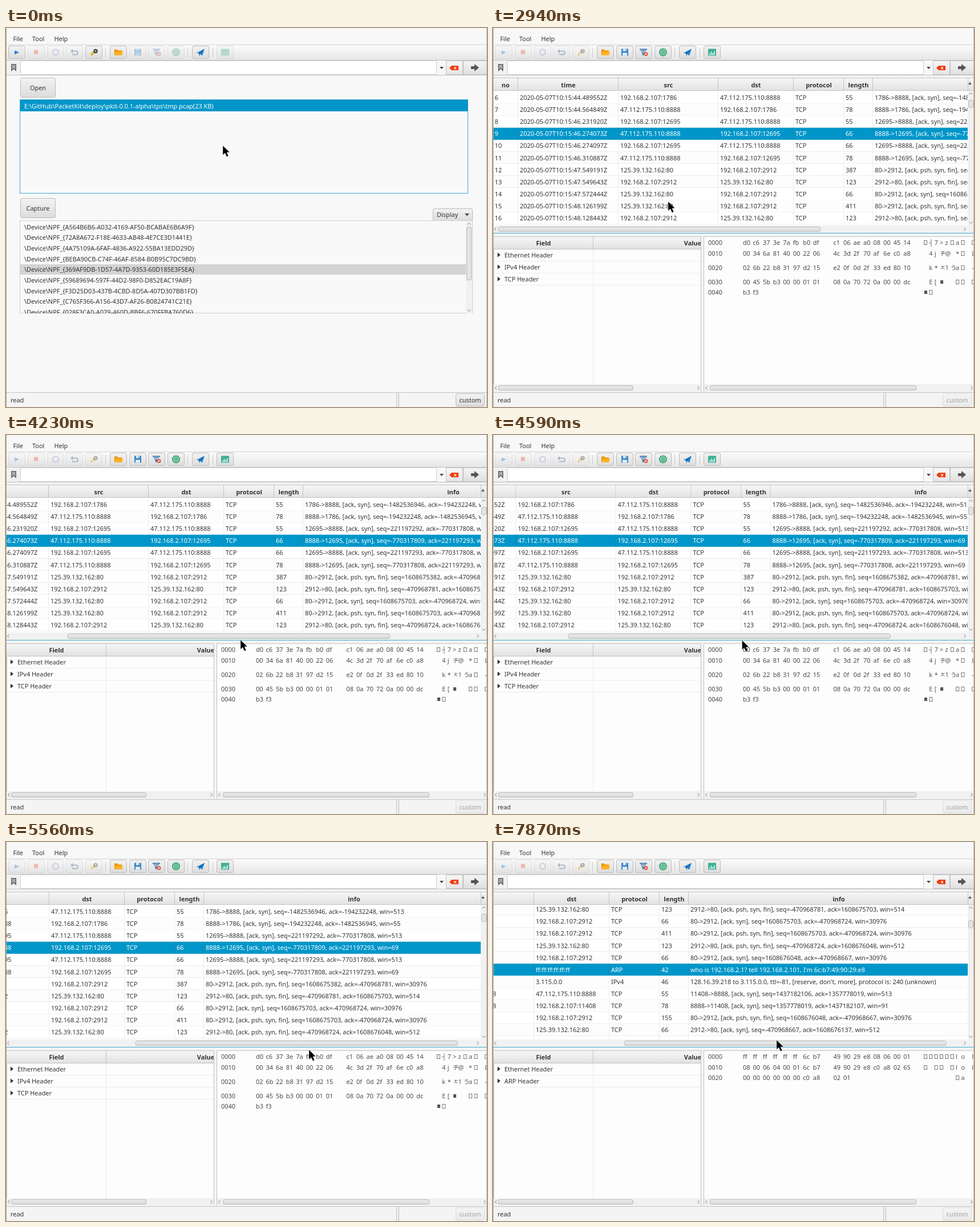
These frames come from a looping animation (843x664 px, 8 s). An HTML page with a canvas:

```html
<!DOCTYPE html>
<html lang="en">
<head>
<meta charset="utf-8">
<title>Packet capture viewer</title>
<style>
html, body { margin: 0; width: 100%; height: 100%; overflow: hidden; background: #f4f4f4; }
canvas { display: block; }
</style>
</head>
<body>
<canvas id="stage" width="843" height="664"></canvas>
<script>
const c = document.getElementById('stage').getContext('2d');
const LOOP = 8000, STEP = 120;
const FONT = '"Noto Sans", "Open Sans", sans-serif';
const INK = '#333', BLUE = '#0096c9', EDGE = '#c3c3c3', SOFT = '#ececec';

// start, steps, then the values reached: cursor x, y, scroll x, scroll y
const MOVES = [
  [120, 5, 284, 134, 0, 0],
  [1800, 5, 321, 190, 0, 0],
  [2680, 2, 317, 239, 0, 0],
  [2940, 1, 307, 304, 0, 0],
  [3080, 3, 312, 347, 0, 0],
  [3600, 5, 402, 356, 132, 0],
  [4230, 1, 411, 359, 145, 0],
  [4350, 4, 445, 360, 191, 0],
  [4960, 1, 451, 361, 199, 0],
  [5080, 5, 531, 364, 319, 0],
  [5680, 1, 519, 353, 323, 0],
  [5800, 2, 331, 274, 323, 0],
  [6070, 2, 331, 274, 323, 76],
  [6340, 2, 331, 274, 323, 151.6],
  [6580, 3, 340, 224, 323, 151.6],
  [6970, 3, 412, 323, 323, 151.6],
  [7360, 1, 459, 336, 323, 151.6],
  [7510, 4, 497, 347, 323, 151.6]
];

const HOSTS = { A: '192.168.2.107', B: '47.112.175.110', C: '125.39.132.162' };
const ROWS = `44.489552 A:1786 B:8888 55 s -1482536946 -194232248 513
44.564849 B:8888 A:1786 78 s -194232248 -1482536945 55
46.231920 A:12695 B:8888 55 s 221197292 -770317808 513
46.274073 B:8888 A:12695 66 s -770317809 221197293 69
46.274097 A:12695 B:8888 66 s 221197293 -770317808 513
46.310887 B:8888 A:12695 78 s -770317808 221197293 69
47.549191 C:80 A:2912 387 f 1608675382 -470968781 30976
47.549643 A:2912 C:80 123 f -470968781 1608675703 514
47.572444 C:80 A:2912 66 s 1608675703 -470968724 30976
48.126199 C:80 A:2912 411 f 1608675703 -470968724 30976
48.128443 A:2912 C:80 123 f -470968724 1608676048 512
48.171020 C:80 A:2912 66 s 1608676048 -470968667 30976
arp
ip
48.902114 A:11408 B:8888 55 s 1437182106 1357778019 513
48.940382 B:8888 A:11408 78 s 1357778019 1437182107 91
49.120417 C:80 A:2912 155 f 1608676048 -470968667 30976
49.160933 A:2912 C:80 66 s -470968667 1608676137 512
49.310226 B:8888 A:11408 106 f 1357778019 1437182107 91`.split('\n').map((line, i) => {
  const [time, src, dst, len, kind, seq, ack, win] = line.split(' ');
  const stamp = s => `2020-05-07T10:15:${s}Z`;
  if (time === 'arp') return [18, stamp('48.300152'), '6c:b7:49:90:29:e8', 'ff:ff:ff:ff:ff:ff', 'ARP', 42,
    "who is 192.168.2.1? tell 192.168.2.101, I'm 6c:b7:49:90:29:e8"];
  if (time === 'ip') return [19, stamp('48.611840'), '128.16.39.218', '3.115.0.0', 'IPv4', 46,
    "128.16.39.218 to 3.115.0.0, ttl=-81, [reserve, don't, more], protocol is: 240 (unknown)"];
  const host = s => HOSTS[s[0]] + s.slice(1), port = s => s.split(':')[1];
  const flags = kind === 's' ? 'ack, syn' : 'ack, psh, syn, fin';
  return [i + 6, stamp(time), host(src), host(dst), 'TCP', len,
    `${port(src)}->${port(dst)}, [${flags}], seq=${seq}, ack=${ack}, win=${win}`];
});
const COLS = ['no', 'time', 'src', 'dst', 'protocol', 'length', 'info'];
const COL_X = [0, 44, 220, 395, 527, 615, 666, 1192];

// each dump line: y, bytes, characters
const DUMPS = {
  first: { tree: ['Ethernet Header', 'IPv4 Header'], lines: [
    [376, 'b0dfc106aea0d0c6373e7afb0800d502', 'a□□□a □┤ 7'],
    [395, '0020ae67e62daff00000801027da2bef', '  agW-a□'],
    [413, '00000101080a00dce44700dce447', '  □□□  | |']] },
  tcp: { tree: ['Ethernet Header', 'IPv4 Header', 'TCP Header'], lines: [
    [376, 'd0c6373e7afbb0dfc106aea008004514', '□┤7>z□a□ □'],
    [395, '00346a81400022064c3d2f70af6ec0a8', ' 4jチ@ *□ L'],
    [420, '026b22b83197d215e20f0d2f33ed8010', ' k*ㅈ1うa□ -'],
    [445, '00455bb300000101080a70720a0000dc', ' E[■  □□ □'],
    [463, 'b3f3', '■□']] },
  arp: { tree: ['Ethernet Header', 'ARP Header'], lines: [
    [376, 'ffffffffffff6cb7499029e808060001', '□□□□□□lo l'],
    [395, '0800060400016cb7499029e8c0a80265', '□ □□ □lo l'],
    [413, '000000000000c0a80201', '      □a']] }
};

function pose(t) {
  let now = [380, 206, 0, 0];
  for (const [start, n, ...to] of MOVES) {
    if (t < start) break;
    const k = Math.min(n, Math.floor((t - start) / STEP) + 1) / n;
    now = now.map((v, i) => v + (to[i] - v) * k);
  }
  return now;
}

function text(s, x, y, { size = 10.95, bold, color = INK, align = 'left' } = {}) {
  c.font = `${bold ? 'bold ' : ''}${size}px ${FONT}`;
  c.textAlign = align;
  c.fillStyle = color;
  c.fillText(s, x, y + 4);
}
function box(x, y, w, h, fill, line) {
  if (fill) { c.fillStyle = fill; c.fillRect(x, y, w, h); }
  if (line) { c.strokeStyle = line; c.lineWidth = 1; c.strokeRect(x + .5, y + .5, w - 1, h - 1); }
}
function shade(y, h, a, b) {
  const g = c.createLinearGradient(0, y, 0, y + h);
  g.addColorStop(0, a); g.addColorStop(1, b);
  return g;
}
function poly(pts, fill) {
  c.beginPath();
  for (let i = 0; i < pts.length; i += 2) c.lineTo(pts[i], pts[i + 1]);
  c.closePath();
  c.fillStyle = fill; c.fill();
}
function disc(x, y, r, fill) {
  c.beginPath(); c.arc(x, y, r, 0, 7);
  c.fillStyle = fill; c.fill();
}
function ring(x, y, r, line, width) {
  c.beginPath(); c.arc(x, y, r, 0, 7);
  c.strokeStyle = line; c.lineWidth = width; c.stroke();
}
function round(x, y, w, h, r, fill, line, width = 1) {
  c.beginPath(); c.roundRect(x + .5, y + .5, w - 1, h - 1, r);
  c.fillStyle = fill; c.fill();
  c.strokeStyle = line; c.lineWidth = width; c.stroke();
}
function clip(x, y, w, h, draw) {
  c.save(); c.beginPath(); c.rect(x, y, w, h); c.clip(); draw(); c.restore();
}
function fade(a, draw) { c.save(); c.globalAlpha *= a; draw(); c.restore(); }
function button(x, y, w, h, label) {
  round(x, y, w, h, 2.5, shade(y, h, '#f3f3f3', '#dcdcdc'), '#bcbcbc');
  if (label) text(label, x + w / 2, y + h / 2, { align: 'center' });
}
function chevron(x, y, dx, dy) {
  c.beginPath();
  c.moveTo(x - dx * 1.5 - dy * 3, y - dy * 1.5 - dx * 3);
  c.lineTo(x + dx * 1.5, y + dy * 1.5);
  c.lineTo(x - dx * 1.5 + dy * 3, y - dy * 1.5 + dx * 3);
  c.strokeStyle = '#777'; c.lineWidth = 1; c.stroke();
}
function hbar(x, y, w, from, to) {
  box(x, y, w, 13, '#f1f1f1');
  chevron(x + 4, y + 6.5, -1, 0); chevron(x + w - 4, y + 6.5, 1, 0);
  round(from, y + 2, to - from, 9, 2.5, shade(y, 11, '#f0f0f0', '#d9d9d9'), '#b9b9b9');
}
function vbar(x, y, h, from, to) {
  box(x, y, 11, h, '#f1f1f1');
  chevron(x + 5.5, y + 5, 0, -1); chevron(x + 5.5, y + h - 5, 0, 1);
  round(x + 1, from, 9, to - from, 2.5, '#e4e4e4', '#b9b9b9');
}

const ICONS = [
  () => poly([-4, -3, 4, 0, -4, 4], '#1a82dc'),
  () => box(-4, -4, 7, 7, '#ef5a3c'),
  () => ring(0, 0, 5, '#8c95c4', 2),
  () => {
    poly([-7, -2, -3, -6, -3, 2], '#44688e');
    c.beginPath(); c.moveTo(-4, -2); c.lineTo(3, -2); c.arc(3, 1, 3, -1.57, 1.57); c.lineTo(-4, 4);
    c.strokeStyle = '#44688e'; c.lineWidth = 2; c.stroke();
  },
  () => {
    c.lineCap = 'round';
    c.beginPath(); c.moveTo(-4, 4); c.lineTo(1, -1);
    c.strokeStyle = '#e0ac12'; c.lineWidth = 3.5; c.stroke();
    ring(3, -2, 2.5, '#444', 2.5);
    c.lineCap = 'butt';
  },
  () => {
    poly([-7, -5, -2, -5, -1, -3, 6, -3, 6, 5, -7, 5], '#f29200');
    poly([-5, -1, 8, -1, 6, 5, -7, 5], '#ffb21c');
  },
  () => {
    box(-6, -6, 12, 12, '#3c86c4');
    box(-3, -6, 6, 4, '#e8f1f8'); box(-4, 1, 8, 5, '#e8f1f8'); box(1, -5, 1, 3, '#3c86c4');
  },
  () => {
    box(-7, -6, 13, 2, '#3678b4'); box(-5, -3, 9, 1.5, '#3678b4');
    poly([-4, 0, 2, 0, 0, 3, 0, 6, -2, 5, -2, 3], '#3678b4');
    ring(4, 3, 2.5, '#e4573d', 2);
  },
  () => { ring(0, 0, 6, '#3aa876', 2); disc(0, 0, 4.5, '#67bd96'); },
  () => { poly([-7, 1, 7, -6, 3, 6, -1, 3], '#2385d4'); poly([-3, 2, 7, -6, -1, 3, -2, 7], '#135c9f'); },
  () => {
    box(-7, -6, 14, 12, '#3fae94');
    [3, 6, 4, 7].forEach((h, i) => box(-5 + i * 2.7, 5 - h, 1.5, h, '#e9fff9'));
  }
];
const ICON_X = [4, 38, 72, 105, 139, 182, 216, 249, 283, 326, 369];

function frame(loaded, focusOpen) {
  box(0, 0, 843, 664, '#f4f4f4');
  box(0, 0, 843, 30, '#f8f8f8');
  text('File', 12.5, 18.5); text('Tool', 46, 18.5); text('Help', 84.5, 18.5);
  box(0, 29, 843, 1, '#d2d2d2');
  box(0, 30, 843, 26, shade(30, 26, '#fbfbfb', '#e6e6e6'));
  const on = loaded ? [5, 6, 7, 8, 9, 10] : [0, 4, 5, 9];
  ICON_X.forEach((x, i) => fade(on.includes(i) ? 1 : .38, () => {
    button(x, 31, 30, 23);
    if (i === 5 && focusOpen) round(x, 31, 30, 23, 2.5, '#eaeaea', '#039ed3', 2);
    c.translate(x + 15, 42.5);
    ICONS[i]();
  }));
  for (const x of [174, 318, 362]) box(x, 35, 1, 16, '#cacaca');

  box(0, 56, 843, 28, '#f1f1f1');
  box(0, 56, 843, 1, EDGE); box(0, 82, 843, 1, EDGE);
  poly([9, 63, 18, 63, 18, 76, 13.5, 72, 9, 76], '#666');
  poly([10.5, 64.5, 16.5, 64.5, 16.5, 72.5, 13.5, 70, 10.5, 72.5], '#aaa');
  box(25, 57, 730, 25, '#fff', '#cfcfcf');
  box(755, 57, 16, 25, '#f8f8f8');
  poly([760, 68, 767, 68, 763.5, 72], '#444');
  box(771, 57, 30, 25, shade(57, 25, '#f8f8f8', '#e4e4e4'), EDGE);
  poly([777, 70, 781, 66, 793, 66, 793, 74, 781, 74], '#f03c0e');
  text('×', 787, 69.5, { size: 10, bold: true, color: '#fff', align: 'center' });
  box(801, 57, 42, 25, shade(57, 25, '#f5f5f5', '#dfdfdf'), EDGE);
  poly([815, 67, 821, 67, 821, 63, 829, 69.5, 821, 76, 821, 72, 815, 72], '#555');

  box(0, 638, 843, 1, EDGE);
  text('read', 8, 651.5);
  box(684, 639, 5, 25, '#eee'); box(684, 639, 1, 25, EDGE); box(688, 639, 1, 25, EDGE);
  fade(loaded ? .4 : 1, () => button(788, 640, 51, 23, 'custom'));
}

function start() {
  box(0, 84, 843, 554, '#f8f8f8');
  button(25, 87, 62, 35, 'Open');
  box(24, 125, 786, 165, '#f9f9f9', '#3fa9cf');
  box(25, 126, 784, 20, BLUE);
  text('E:\\GitHub\\PacketKit\\deploy\\pkit-0.0.1-alpha\\tps\\tmp.pcap(23 KB)', 32, 136.5, { color: '#fff' });
  button(25, 298, 62, 35, 'Capture');
  button(748, 316, 70, 22);
  text('Display', 755, 327);
  poly([804, 325, 812, 325, 808, 329.5], '#444');
  box(24, 337, 794, 163, '#f9f9f9', '#d0d0d0');
  box(25, 414, 781, 18, '#d3d3d3');
  const ids = ['A564B6B6-A032-4169-AF50-BCABAE6B6A9F', '72A8A672-F18E-4633-AB48-4E7CE3D1441E',
    '4A75109A-6FAF-4836-A922-55BA13EDD29D', 'BEBA90CB-C74F-46AF-8584-B0B95C7DC9BD',
    '369AF9DB-1D57-4A7D-9353-60D185E3F5EA', '59689694-597F-44D2-98F0-D852EAC19A8F',
    'F3D25D03-437B-4CBD-8D5A-407D307BB1FD', 'C765F366-A156-43D7-AF26-B0824741C21E',
    '028F3CA0-A079-460D-BBF6-670FFBA760D6'];
  clip(25, 338, 781, 162, () => ids.forEach((id, i) =>
    text(`\\Device\\NPF_{${id}}`, 32, 348.5 + i * 18.7)));
  vbar(806, 338, 162, 348, 442);
}

function header(x, y, w, h, label) {
  box(x, y, w, h, shade(y, h, '#f6f6f6', '#e2e2e2'));
  box(x + w - 1, y, 1, h, EDGE);
  text(label, x + w / 2, y + h / 2 + .5, { bold: true, align: 'center' });
}

function table(sx, sy, picked, focused) {
  box(0, 84, 843, 276, '#f4f4f4');
  box(0, 87, 843, 1, EDGE);
  box(0, 88, 843, 22, shade(88, 22, '#f6f6f6', '#e2e2e2'));
  box(1, 110, 831, 236, '#fff');
  clip(1, 88, 831, 258, () => {
    COLS.forEach((name, i) => header(COL_X[i] - sx, 88, COL_X[i + 1] - COL_X[i], 22, name));
  });
  clip(1, 110, 831, 236, () => {
    ROWS.forEach((row, r) => {
      const y = 111.4 + r * 21.12 - sy, sel = row[0] === picked;
      box(0, y, 832, 21.12, sel ? BLUE : r % 2 ? '#fdfdfd' : '#fff');
      box(0, Math.round(y + 20.2), 832, 1, sel ? BLUE : SOFT);
      row.forEach((cell, i) => {
        box(COL_X[i + 1] - sx - 1, y, 1, 21.12, sel ? '#1e86ab' : SOFT);
        clip(COL_X[i] - sx, y, COL_X[i + 1] - COL_X[i], 21.12, () =>
          text(cell, COL_X[i] - sx + 3, y + 10.5, { color: sel ? '#fff' : INK }));
      });
    });
  });
  box(0, 109, 843, 1, EDGE);
  box(832, 88, 1, 22, EDGE);
  text('+', 836, 97, { bold: true, align: 'center' });
  const knob = 126 + sy * .073;
  vbar(832, 110, 236, knob, knob + 14);
  hbar(0, 346, 831, 9 + sx * .683, 574 + sx * .683);
  box(832, 346, 11, 13, '#f1f1f1');
  box(0, 359, 843, 1, focused ? '#3fa9cf' : EDGE);
}

function details({ tree, lines }) {
  box(0, 360, 843, 278, '#f4f4f4');
  box(1, 365, 364, 272, '#fdfdfd', EDGE);
  clip(1, 366, 363, 259, () => {
    header(1, 366, 175, 21, 'Field');
    header(176, 366, 348, 21, 'Value');
    box(1, 387, 363, 1, EDGE);
    box(175, 388, 1, 240, SOFT);
    tree.forEach((name, i) => {
      const y = 397.5 + i * 21.1;
      poly([8, y - 4, 13, y, 8, y + 4], INK);
      text(name, 20, y);
      box(1, Math.round(y + 10), 363, 1, SOFT);
    });
  });
  hbar(1, 624, 363, 9, 246);
  box(369, 365, 474, 272, '#fdfdfd', EDGE);
  lines.forEach(([y, bytes, chars], n) => {
    const dim = { color: '#484848' };
    text('00' + n + '0', 377, y, dim);
    bytes.match(/../g).forEach((b, i) => text(b, 438 + i * 17.55 + (i > 7 ? 18 : 0), y, dim));
    [...chars].forEach((ch, i) => {
      const x = 755 + i * 9.35;
      if (ch === '□') box(x, y - 4, 6, 8, null, '#777');
      else if (ch === '■') box(x + 1, y - 3, 5, 6, '#555');
      else text(ch, x, y, { color: '#555' });
    });
  });
  hbar(370, 624, 473, 380, 742);
}

function cursor(x, y) {
  c.save();
  c.translate(x, y);
  poly([0, 0, 0, 16.5, 3.8, 13, 6.8, 19.5, 9.8, 18.2, 7, 12, 11.8, 11.6], '#000');
  c.strokeStyle = 'rgba(255,255,255,.6)'; c.lineWidth = .6; c.stroke();
  c.restore();
}

function draw(t) {
  const [x, y, sx, sy] = pose(t);
  const loaded = t >= 1400, focused = t >= 2560;
  frame(loaded, loaded && !focused);
  if (loaded) {
    table(sx, sy, t >= 6820 ? 18 : focused ? 9 : 0, focused);
    details(t >= 6970 ? DUMPS.arp : focused ? DUMPS.tcp : DUMPS.first);
  } else start();
  box(0, 0, 1, 664, '#a9a9a9');
  box(842, 0, 1, 664, '#b5b5b5');
  cursor(x, y);
}

const began = performance.now();
(function tick() {
  draw((performance.now() - began) % LOOP);
  requestAnimationFrame(tick);
})();
</script>
</body>
</html>
```
